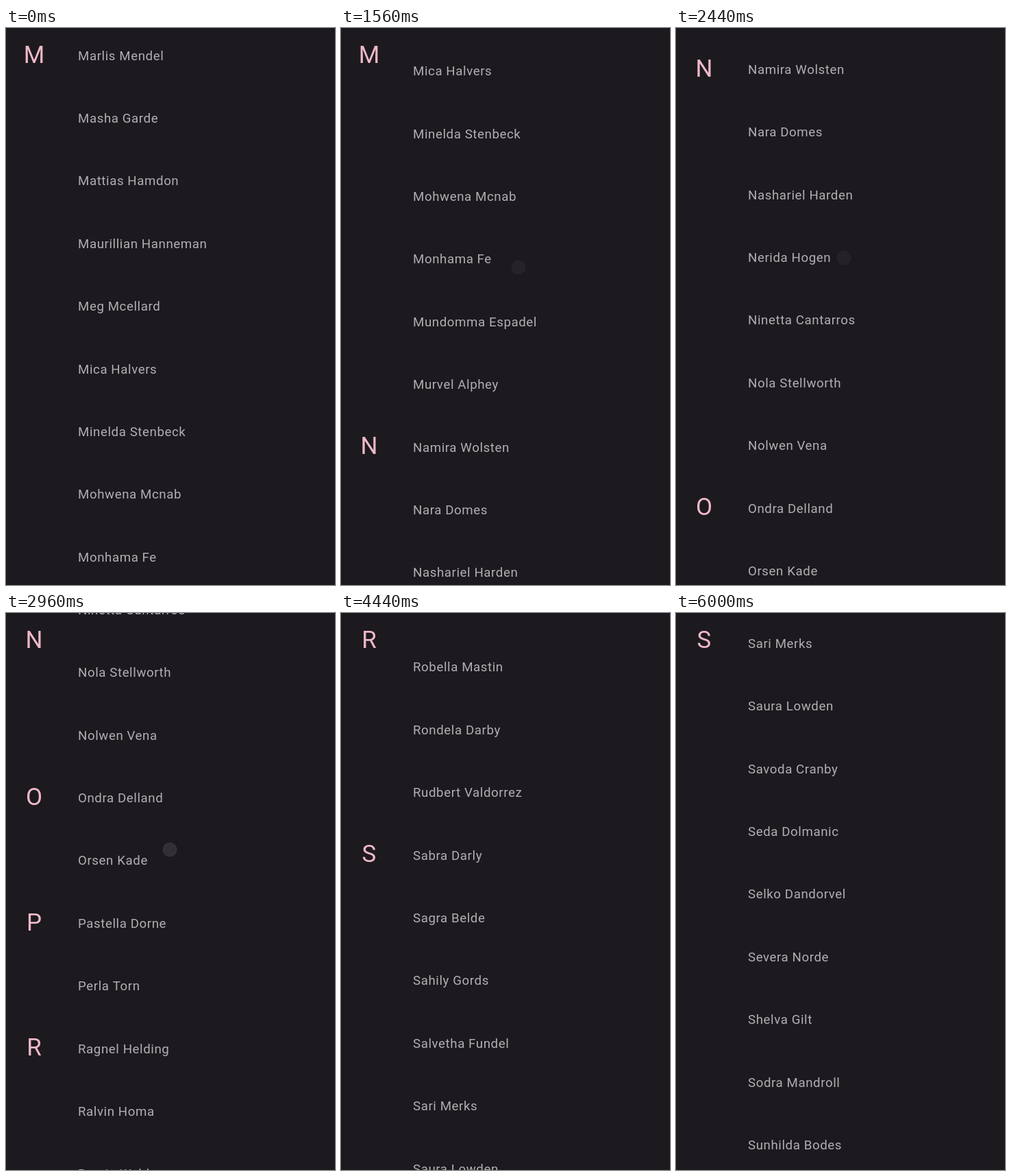
These frames come from a looping animation (480 by 812 pixels, 6440 ms). An HTML page with a canvas:

```html
<!DOCTYPE html>
<html lang="en">
<head>
<meta charset="utf-8">
<title>Contact list</title>
<style>
  html, body { margin: 0; width: 100%; height: 100%; overflow: hidden; background: #1c1a1f; }
  canvas { display: block; }
</style>
</head>
<body>
<canvas id="stage" width="480" height="812"></canvas>
<script>
const names = `Marlis Mendel,Masha Garde,Mattias Hamdon,Maurillian Hanneman,Meg Mcellard,Mica Halvers,
Minelda Stenbeck,Mohwena Mcnab,Monhama Fe,Mundomma Espadel,Murvel Alphey,Namira Wolsten,Nara Domes,
Nashariel Harden,Nerida Hogen,Ninetta Cantarros,Nola Stellworth,Nolwen Vena,Ondra Delland,Orsen Kade,
Pastella Dorne,Perla Torn,Ragnel Helding,Ralvin Homa,Ramia Welds,Randel Cory,Rasmund Welters,
Ritva Dentley,Robella Mastin,Rondela Darby,Rudbert Valdorrez,Sabra Darly,Sagra Belde,Sahily Gords,
Salvetha Fundel,Sari Merks,Saura Lowden,Savoda Cranby,Seda Dolmanic,Selko Dandorvel,Severa Norde,
Shelva Gilt,Sodra Mandroll,Sunhilda Bodes`.split(/,\s*/);

const LOOP = 6440, STEP = 40, ROW = 91.4, FIRST_Y = 40, PIN_Y = 39;
const DRAG_MS = 380, DRAG_PX = 375, FLING_MS = 1000;

// Each swipe: touch time, finger path, distance of the fling after release
const swipes = [
  { start: 1059, x0: 259, x1: 259, y: 724, fling: 147.5 },
  { start: 1935, x0: 235, x1: 245, y: 710, fling: 235 },
  { start: 2500, x0: 234, x1: 239, y: 720, fling: 76 },
  { start: 3260, x0: 238, x1: 243, y: 702, fling: 240 },
  { start: 3850, x0: 250, x1: 260, y: 715, fling: 270 },
  { start: 4620, x0: 246, x1: 253, y: 715, fling: 231.5 }
];

const ctx = document.getElementById("stage").getContext("2d");
const clamp01 = v => Math.min(1, Math.max(0, v));
const dragPart = u => clamp01(u / DRAG_MS) ** 1.15;
const flingPart = u => 1 - (1 - clamp01((u - DRAG_MS) / FLING_MS)) ** 4;

function scrollAt(t) {
  return swipes.reduce((sum, swipe, i) => {
    const end = i + 1 < swipes.length ? swipes[i + 1].start : LOOP;
    const u = Math.min(t, end) - swipe.start;
    return sum + DRAG_PX * dragPart(u) + swipe.fling * flingPart(u);
  }, 0);
}

function drawNames(rowY) {
  ctx.font = "18.7px Roboto, sans-serif";
  ctx.letterSpacing = "0.584px";
  ctx.textAlign = "left";
  ctx.fillStyle = "#b2afb3";
  names.forEach((name, i) => {
    const y = rowY(i);
    if (y > -20 && y < 832) ctx.fillText(name, 105, y + 6.6);
  });
}

// An initial sticks to the top until the last row of its section carries it away
function drawInitials(rowY) {
  ctx.font = "35px Roboto, sans-serif";
  ctx.letterSpacing = "0px";
  ctx.textAlign = "center";
  ctx.fillStyle = "#efb8c8";
  const heads = names.map((_, i) => i).filter(i => !i || names[i][0] !== names[i - 1][0]);
  heads.forEach((row, k) => {
    let y = Math.max(PIN_Y, rowY(row) - 2);
    if (k + 1 < heads.length) y = Math.min(y, rowY(heads[k + 1]) - 2 - ROW);
    if (y > -30 && y < 842) ctx.fillText(names[row][0], 41, y + 12.4);
  });
}

function drawTouch(t) {
  for (const { start, x0, x1, y } of swipes) {
    const u = t - start;
    if (u < 0 || u > DRAG_MS + 200) continue;
    const p = dragPart(u);
    ctx.globalAlpha = Math.exp(-Math.max(0, u - DRAG_MS) / 45);
    ctx.beginPath();
    ctx.arc(x0 + (x1 - x0) * p, y - DRAG_PX * p, 10, 0, 2 * Math.PI);
    ctx.fillStyle = "rgba(225,220,228,.68)";
    ctx.fill();
    ctx.strokeStyle = "rgba(220,215,220,.6)";
    ctx.lineWidth = 1;
    ctx.stroke();
    ctx.globalAlpha = 1;
  }
}

const begin = performance.now();

function draw() {
  const t = Math.floor(((performance.now() - begin) % LOOP) / STEP) * STEP;
  const scroll = scrollAt(t);
  const rowY = i => FIRST_Y + i * ROW - scroll;
  ctx.fillStyle = "#1c1a1f";
  ctx.fillRect(0, 0, 480, 812);
  drawNames(rowY);
  drawInitials(rowY);
  drawTouch(t);
  requestAnimationFrame(draw);
}
draw();
</script>
</body>
</html>
```
